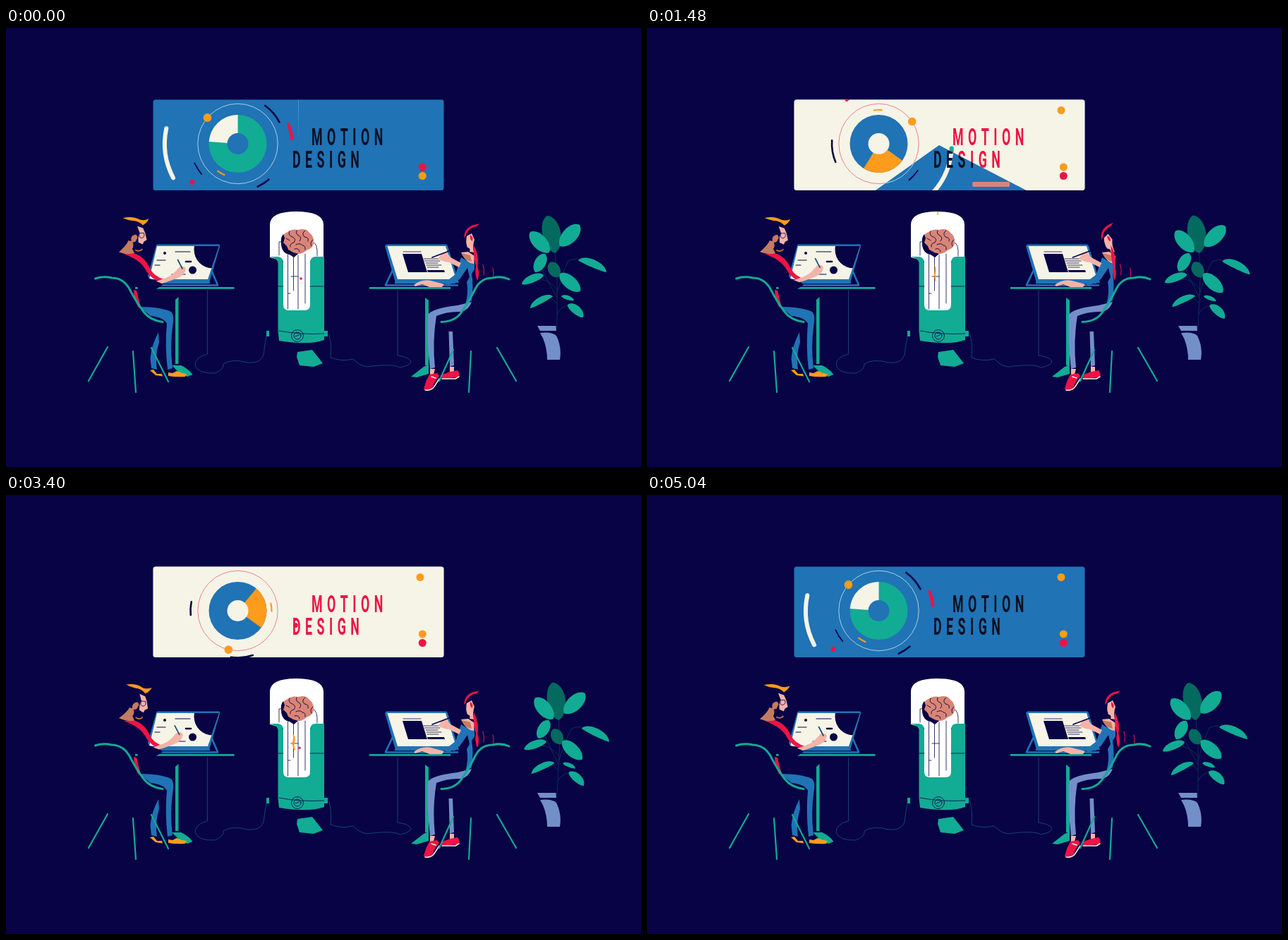
Animation of 900x622 px, one loop 5.08 s. Source, as an HTML page:

```html
<!DOCTYPE html>
<html lang="en">
<head>
<meta charset="utf-8">
<title>Motion design studio</title>
<style>
html, body { margin: 0; width: 100%; height: 100%; overflow: hidden; background: #080345; }
svg { display: block; width: 100vw; height: 100vh; }
text { font: 700 33px Roboto, "Open Sans", sans-serif; letter-spacing: 12px; }
.teal { fill: #12ab94; } .blue { fill: #2073b5; } .navy { fill: #080345; }
.cream { fill: #f6f4e6; } .red { fill: #ee1345; } .orange { fill: #fd9b1c; }
.skin { fill: #f5b3a8; } .tan { fill: #c47c5f; } .lilac { fill: #738fca; }
.line { fill: none; stroke-linecap: round; stroke-linejoin: round; }
.frame { stroke: #12ab94; stroke-width: 2.2; }
.stand { stroke: #2073b5; stroke-width: 2.6; }
.wire { stroke: #1c5f80; stroke-width: .7; }
.ink { stroke: #080345; stroke-width: .8; }
</style>
</head>
<body>
<svg viewBox="0 0 900 622" preserveAspectRatio="none">
<defs>
  <clipPath id="board"><rect x="208.5" y="101.5" width="412" height="128.5" rx="3.5"/></clipPath>
  <clipPath id="wipe"><path id="wedge"/></clipPath>
  <clipPath id="pad"><path d="M214 309H302L286 356H203Z"/></clipPath>
</defs>
<rect width="900" height="622" class="navy"/>

<g clip-path="url(#board)">
  <g id="scenes"></g>
  <g id="orbits" transform="translate(328.5 164)"></g>
  <rect id="salmon" x="461" y="218" width="53" height="7" rx="2" fill="#d9847b"/>
  <g id="ribbon">
    <path class="orange" d="M475 110.500H500Q513 111 518 122H476Q467 116 475 110.500Z"/>
    <path class="red" d="M503 122H527Q528 133 518 134Q508 132 503 122Z"/>
  </g>
  <circle id="third" cx="587" cy="116.500" r="5.500"/>
  <path id="bar" class="red" d="M566 122H680V134H566Q562 128 566 122Z"/>
  <circle id="upper" cx="590.300" cy="197" r="5.500"/>
  <circle id="lower" cx="590.300" cy="209.500" r="5.500"/>
</g>

<!-- cables -->
<path class="line wire" d="M285.500 372V462Q268 466 268 478Q272 490 296 489Q309 484 308 476Q320 468 343 474Q366 476 366 455L369 437"/>
<path class="line wire" d="M458 435Q462 448 460 467Q475 473 492 469Q502 479 512 480Q548 475 558 481Q574 478 574 472Q570 466 555 464V372"/>

<!-- capsule -->
<path fill="#fff" d="M374 325V278Q375 260 411 260Q449 260 450 278V325L431 330V402H393V330Z"/>
<path class="teal" d="M373 324H386Q393 325 393 333V392Q393 400 401 400H423Q431 400 431 392V333Q431 324 439 324H451V442Q430 450 387 443L385.500 430V332Q384 326 373 324Z"/>
<path class="line ink" d="M386 366H393M431 366H450M387 429Q418 435 451 433"/>
<path class="teal" d="M369 429H373V437H369ZM451 429H456V437H451ZM413 459L434 456L449 475L436 480L416 478L412 466Z"/>
<g class="line ink"><circle cx="413" cy="436" r="8.500"/><circle cx="413" cy="436" r="5"/>
  <path d="M410 437L416 434.500M399.500 318V376H403M407.500 323V372M414 322V398M424 320V390M404 352H414M399.500 398V376M392 303H387V322M435 304Q442 304 441 323"/>
</g>
<g id="brain">
  <path fill="#d98576" d="M390 304Q389 293 399 289Q406 284 414 286Q425 283 430 290Q437 295 436 305Q435 312 426 315Q420 321 412 320L408 325L402 321Q390 319 390 304Z"/>
  <path class="navy" d="M390 304Q389 297 393 292L395 298L393 304L398 309L400 314L407 318L414 320L408 325L402 321Q390 319 390 304Z"/>
  <path class="line" stroke="#080345" stroke-width=".9" d="M402 288Q399 294 406 296Q412 299 408 304Q402 305 403 310M412 287Q410 292 415 294Q420 297 416 302M424 287Q418 291 423 296Q430 297 428 302M435 300Q430 304 433 309M411 307Q417 304 420 308Q425 308 424 314M409 313Q415 311 416 317M397 298L402 301"/>
</g>
<path id="spark" class="red" d="M409 296L414 293L416 295L421 293L419 298L415 300L412 298L410 301Z"/>
<path id="flame" class="orange" d="M-2 12Q3 4-1-1Q-2-8 4-12Q2-4 5 1Q5 8 0 12Z"/>
<circle id="bead" class="red" r="1.800"/>
<path id="bits" class="blue" d="M421 282L426 280V283ZM430 281L435 276L433 286ZM443 304L446 312L442 316Z"/>
<path id="tick" class="orange" d="M411.500 260H412.800V265H411.500Z"/>

<!-- left desk -->
<path class="line stand" d="M290 341L300 364M196 364.500H300M196 361H288"/>
<path class="blue" d="M213 307.500L215 306.500H302Q303.500 307 303 310L288 361H194L200 355Z"/>
<g clip-path="url(#pad)">
  <path class="cream" d="M200 300H310V360H200Z"/>
  <circle class="navy" cx="293" cy="314" r="26.500"/><circle class="navy" cx="264.500" cy="343" r="5.500"/><circle class="navy" cx="225" cy="319" r="2"/>
  <path class="line" stroke="#080345" stroke-width="1.200" d="M240 317H261M214 329H226M211 336H218M235 349H254"/>
  <path class="line" stroke="#080345" stroke-width="2.600" d="M255 331H262"/>
</g>
<path class="teal" d="M183 367H323.500V369.800H183ZM240 385L244.500 381V476H240ZM235 478H248Q259 483 264.500 491L257 494L246 489Z"/>
<path class="navy" d="M180 326L195 341L203 355L216 358L222 364L212 370.500H187Z"/>

<!-- man -->
<path class="blue" d="M189 395Q218 395 234 402Q239 407 236.500 420Q232 450 236 482L229 484Q225 450 228 419Q224 410 205 408ZM216 431Q206 450 204.500 468L206 482L214 484Q211 464 217 445Z"/>
<path class="orange" d="M204 485L209 484L214 490L221 490L222 493.500L212 492ZM230 488L236 489L242 486Q248 489 256 490L254 494Q241 495 230 493Z"/>
<path class="red" d="M167 320L181 319Q197 324 204 341Q210 352 224 356L215 358.500Q203 353 197 341Q189 328 167 320ZM181 371L185 372Q188 386 192 398L187 395Q181 384 181 371Z"/>
<g id="manHead">
  <path class="tan" d="M160 317Q171 308 174 301L178 302Q177 296 181 294Q186 291 187 297L184 303L180 304Q182 309 179 313L182 319Q172 322 160 317Z"/>
  <path class="skin" d="M187 281L195 284L198 291L200 301L196 303L194 307L188 304L188 297L190 290Z"/>
  <path class="line" stroke="#c9772f" stroke-width="1.800" d="M184 315Q189 318 193 314"/>
  <path class="line ink" d="M184 291H190Q188 298 193 298Q198 297 196 291H190"/>
  <path class="orange" d="M167 269Q181 266 191 272Q198 274 203.500 271Q202 276 195 280Q189 273 180 273Q173 272 167 269Z"/>
</g>
<g id="manHand">
  <path class="skin" d="M213 359L224 355Q234 352 240 345L246 338.500Q253 336 255 341Q254 349 246 353Q232 359 221 362Z"/>
  <path class="line" stroke="#144d79" stroke-width="1.700" d="M243.500 328.500L250 341"/>
</g>
<path class="line" stroke="#12ab94" stroke-width="3" d="M126.500 355Q138 351 150 354Q165 354 174 368Q185 389 195 402Q204 414 222 416.500"/>
<path class="line frame" d="M144 452L117 500M180 458L184 516M206 453L230 501"/>

<!-- right desk -->
<path class="line stand" d="M549 341L538 364M538 364.500H640M552 361H636"/>
<path class="blue" d="M537 309L539 306.500H624L626 309L642 361H552Z"/>
<path class="cream" d="M540.500 309H623L638 356H555Z"/>
<path class="navy" d="M562 320H589L597 346H570Z"/>
<path class="line" stroke="#080345" stroke-width=".8" d="M563 317H588M592 327H614M593 330H615M595 333H612M596 336H617M597 339H613"/>
<path class="navy" d="M597 343H621L622 346H598Z"/>
<path class="teal" d="M515 367H630V369.800H515ZM594 382L599 386V478H594ZM574 494L592 480L599 477V490L582 495Z"/>

<!-- woman -->
<path class="lilac" d="M598 406Q605 397 640 393L660 388Q656 399 646 402Q626 401 610 408Q604 444 608 481L601 483Q596 440 598 406ZM627.500 430H633L635 478L629 480Z"/>
<path class="skin" d="M601 483H608L606 491H601ZM629 480H635V488H629Z"/>
<path class="red" d="M600 491L611 489L614 493Q606 502 605 509Q600 514 592 512Q594 501 600 491ZM618 491L630 487L640 485Q645 491 641 495L618 497Z"/>
<path class="line" stroke="#f6f4e6" stroke-width="1.500" d="M594 513Q603 514 607 508L614 497M618 497H637L642 494M603 494L609 496"/>
<path class="blue" d="M645 325L655 331L664 331V342L660 348Q663 365 660 386L651 392Q656 374 653 360L657 353L654 340L643 356L628 364L620 362L637 349Z"/>
<path class="skin" d="M645 318L655 317L664 323L663 334Q652 333 645 318ZM578 364Q588 356 600 357.500L621 363L618 367H600L590 363L580 366Z"/>
<path class="tan" d="M646 319L658 322L660 331Q650 330 646 319Z"/>
<g id="womanHand">
  <path class="skin" d="M612 327L619 318L625 318L630 325L645 333L642 339L628 332Q619 331 615 328Z"/>
  <path class="line" stroke="#080345" stroke-width="1.800" d="M604 325L628 316"/>
</g>
<g id="womanHead">
  <path class="skin" d="M653 295L660 291L664 300Q661 308 663 318L657 317Q659 312 654 311Q651 304 653 295Z"/>
  <path class="red" d="M649 297Q650 279 671 277.500L667 281Q655 283 651.500 294ZM658 293Q663 296 661 302Q657 300 658 293Z"/>
</g>
<g id="locks">
  <path class="red" d="M663 308Q671 322 668.500 338Q672 350 668 358Q664 348 666 338Q662 324 663 308Z"/>
  <path class="line" stroke="#ee1345" stroke-width="1" d="M676 335Q678.500 343 677 350M690 340Q692 346 690.500 352"/>
</g>
<path class="line" stroke="#12ab94" stroke-width="3" d="M713 356Q702 351 690 354Q674 354 666 368Q656 388 646 402Q637 416 617 416.500"/>
<path class="line frame" d="M634 456L614 500M659 458L656 516M696 453L723 500"/>

<!-- plant -->
<g id="plant">
  <path class="line" stroke="#0b3a58" stroke-width=".8" d="M781 424V350Q778 330 777 290M781 378Q787 350 797 330Q810 324 820 330M781 390Q762 372 766 386M781 382Q765 354 757 336M781 405Q788 392 800 393M781 370Q766 354 752 356"/>
</g>
<path class="lilac" d="M753 422H779.500L780 429H757ZM757 432Q774 430 780 436Q788 452 785 470H767Q767 448 757 432Z"/>
</svg>

<script>
const LOOP = 5080, CYCLE = 5040, TAU = Math.PI * 2;
const C = { teal: '#12ab94', blue: '#2073b5', navy: '#080345', cream: '#f6f4e6', red: '#ee1345', orange: '#fd9b1c' };
const $ = id => document.getElementById(id);
const polar = (r, deg) => {
  const a = deg * Math.PI / 180;
  return (r * Math.cos(a)).toFixed(2) + ' ' + (r * Math.sin(a)).toFixed(2);
};
const put = (el, tag, attrs) => {
  const node = document.createElementNS('http://www.w3.org/2000/svg', tag);
  for (const k in attrs) node.setAttribute(k, attrs[k]);
  return el.appendChild(node);
};
const clamp = v => Math.max(0, Math.min(1, v));
const ease = v => (1 - Math.cos(Math.PI * clamp(v))) / 2;
const show = (el, on) => el.setAttribute('visibility', on ? 'visible' : 'hidden');
const within = (t, a, b) => t >= a && t < b;

// Orbiting marks: each makes a whole number of turns per cycle.
const spinners = [];
function orbit(parent, start, turns, attrs, tag = 'path') {
  spinners.push({ el: put(parent, tag, attrs), start, turns });
}
function arc(parent, r, span, width, color, start, turns) {
  orbit(parent, start, turns, {
    d: `M${polar(r, -span / 2)}A${r} ${r} 0 0 1 ${polar(r, span / 2)}`,
    fill: 'none', stroke: color, 'stroke-width': width, 'stroke-linecap': 'round'
  });
}

// The billboard exists in two colourways; the second is wiped over the first.
const letters = [];
function word(parent, str, x, y, color, hidden) {
  const line = put(parent, 'text', { transform: `translate(${x} ${y}) scale(.54 1)`, fill: color });
  [...str].forEach((ch, i) => {
    const el = put(line, 'tspan', {});
    el.textContent = ch;
    letters.push({ el, off: hidden[i] === '1' });
  });
}
function scene(back, disc, slice, ring, mark, ink) {
  const g = put($('scenes'), 'g', {});
  put(g, 'rect', { x: 208, y: 101, width: 413, height: 130, fill: back });
  const dial = put(g, 'g', { transform: 'translate(328.5 164)' });
  put(dial, 'circle', { r: 56.7, fill: 'none', stroke: ring, 'stroke-width': .8 });
  put(dial, 'circle', { r: 41, fill: disc });
  orbit(dial, 184, 2, { d: `M0 0L41 0A41 41 0 0 1 ${polar(41, 86)}Z`, fill: slice });
  put(dial, 'circle', { r: 15, fill: back });
  arc(dial, 103.5, 40, 6, mark, 172, 2);
  word(g, 'MOTION', 433, 166, ink, '101101');
  word(g, 'DESIGN', 406, 198, ink, '010010');
  return g;
}
scene(C.blue, C.teal, C.cream, '#d8e4e6', C.cream, '#0b1024');
scene(C.cream, C.blue, C.orange, '#e5647f', C.teal, C.red).setAttribute('clip-path', 'url(#wipe)');

const orbits = $('orbits');
arc(orbits, 66.5, 27, 2.6, C.navy, 319, 2);
arc(orbits, 67, 16, 2.6, C.navy, 57, 2);
arc(orbits, 67, 16, 1.7, C.navy, 148, -1);
arc(orbits, 48, 13, 2.2, C.orange, 120, -2);
arc(orbits, 77, 15, 4.5, C.red, 347, -1);
orbit(orbits, 140, -2, { cx: 84.5, r: 3.4, fill: C.red }, 'circle');
orbit(orbits, 220.5, 1, { cx: 56.7, r: 5.8, fill: C.orange }, 'circle');

function wedge(from, to) {
  let d = 'M414 166';
  const n = 16;
  for (let i = 0; i <= n; i++) {
    const [x, y] = polar(600, from + (to - from) * i / n).split(' ').map(Number);
    d += `L${x + 414} ${y + 166}`;
  }
  return d + 'Z';
}
function wipe(t) {
  if (t < 3420) {
    const u = ease((t + 40) / 2480);
    return u < 1 ? wedge(-90 + 348 * u, -90 + 708 * u) : wedge(0, 360);
  }
  const u = ease((t - 3420) / 1600);
  return wedge(246 - 348 * u, 606 - 708 * u);
}

// Leaf between two points: w is half its width, bend bows its spine.
function leaf(x1, y1, x2, y2, w, bend = 0, color = C.teal) {
  const dx = x2 - x1, dy = y2 - y1, len = Math.hypot(dx, dy);
  const at = (k, off) => {
    const s = off * 1.33 / len;
    return `${(x1 + dx * k - dy * s).toFixed(1)} ${(y1 + dy * k + dx * s).toFixed(1)}`;
  };
  put($('plant'), 'path', {
    d: `M${x1} ${y1}C${at(.1, bend + w)} ${at(.85, bend + w)} ${x2} ${y2}C${at(.85, bend - w)} ${at(.1, bend - w)} ${x1} ${y1}Z`,
    fill: color
  });
}
const shade = '#04695f';
leaf(767, 266, 778, 319, 13, -1, shade);
leaf(743, 289, 770, 318, 10);
leaf(813, 279, 785, 309, 10.5);
leaf(764, 320, 750, 346, 8);
leaf(771, 332, 783, 353, 8.5, 0, shade);
leaf(762, 350, 731, 363, 5.5, 1.5);
leaf(785, 348, 814, 373, 9);
leaf(811, 329, 851, 346, 5.5, -4);
leaf(775, 380, 743, 397, 4.5, 3);
leaf(787, 380, 805, 386, 3, -1);
leaf(796, 392, 818, 410, 6, -2);

function draw(t) {
  const p = t % CYCLE / CYCLE;
  for (const s of spinners) s.el.setAttribute('transform', `rotate(${s.start + 360 * s.turns * p})`);
  $('wedge').setAttribute('d', wipe(t));

  for (const l of letters) {
    const gone = within(t, 2140, 2280) && l.off || within(t, 2060, 2140) && !l.off;
    l.el.setAttribute('fill-opacity', gone ? 0 : 1);
  }

  const swap = Math.floor(t / 420) % 5 === 0;
  $('upper').setAttribute('fill', swap ? C.red : C.orange);
  $('lower').setAttribute('fill', swap ? C.orange : C.red);
  const third = $('third');
  show(third, t >= 200);
  third.setAttribute('fill', within(t, 1800, 2500) || within(t, 3500, 4300) ? C.red : C.orange);

  const slide = (id, mid, half, speed) => {
    show($(id), within(t, mid - half, mid + half));
    $(id).setAttribute('transform', `translate(${(t - mid) * speed} 0)`);
  };
  slide('salmon', 1480, 140, .15);
  slide('ribbon', 2200, 160, .2);
  slide('bar', 2880, 200, .3);

  // Energy climbing the tube into the brain
  const lap = t < 2400 ? t - 920 : t - 2880;
  show($('flame'), within(t, 760, 1960) || within(t, 2720, 3960));
  $('flame').setAttribute('transform',
    `translate(409 ${387 - lap * .0715}) scale(${Math.cos(lap / 130).toFixed(3)} ${lap > 700 ? .65 : 1})`);
  const bead = $('bead');
  show(bead, t < 300 || within(t, 2760, 4000));
  bead.setAttribute('cx', t < 300 ? 418 : 413 + 3 * Math.sin(lap / 300));
  bead.setAttribute('cy', t < 300 ? 355 - t * .07 : 391 - lap * .063);
  show($('spark'), within(t, 820, 1040));
  show($('bits'), within(t, 3780, 4000));
  show($('tick'), within(t, 1400, 1560) || within(t, 2800, 2960));

  const nod = 3.8 * Math.sin(TAU * (2 * p - .065));
  $('manHead').setAttribute('transform', `rotate(${nod} 175 318)`);
  const draft = Math.cos(TAU * 2 * p) - 1;
  $('manHand').setAttribute('transform', `translate(${2.7 * draft} ${draft})`);

  const lean = Math.sin(Math.PI * clamp((t - 200) / 3300)) ** 2;
  $('womanHead').setAttribute('transform', `rotate(${-16 * lean} 660 318)`);
  $('locks').setAttribute('transform', `translate(${-6 * lean} 0)`);
  $('womanHand').setAttribute('transform', `translate(${Math.sin(TAU * p * 3) * .8} 0)`);
  $('plant').setAttribute('transform', `rotate(${2 * (1 - Math.cos(TAU * p))} 781 425)`);
}

function tick(now) {
  draw(now % LOOP);
  requestAnimationFrame(tick);
}
draw(0);
requestAnimationFrame(tick);
</script>
</body>
</html>
```
